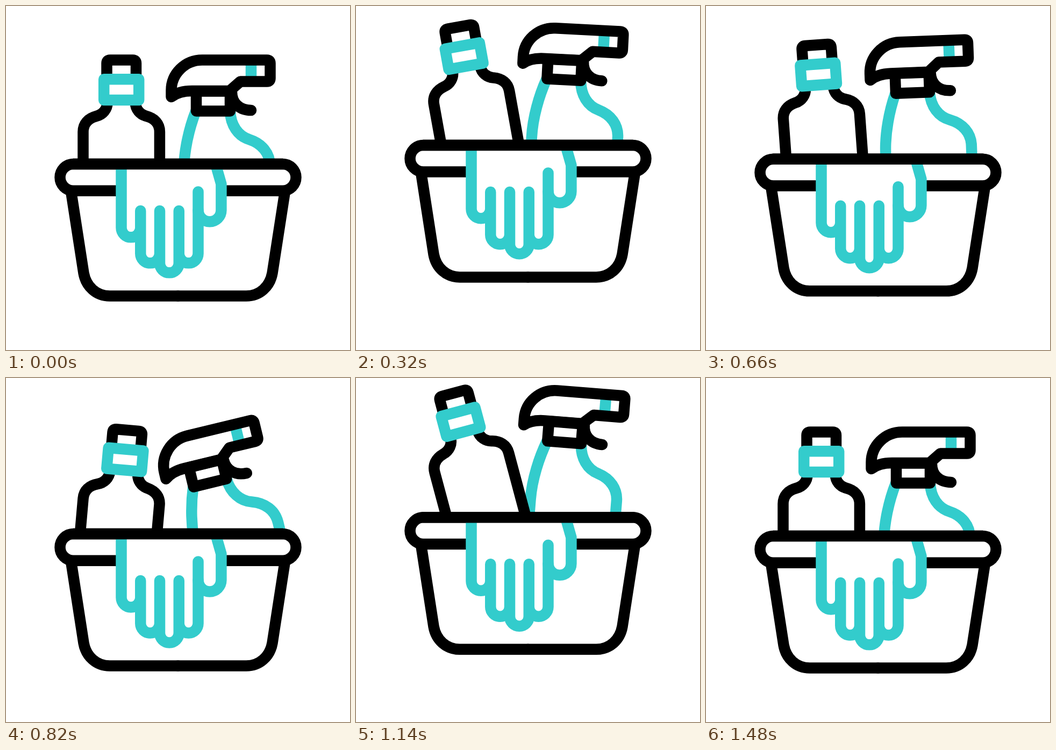
An HTML page for the animation above (2400 ms loop, 640 by 640 pixels).

```html
<!DOCTYPE html>
<html lang="en">
<head>
<meta charset="utf-8">
<title>Cleaning kit</title>
<style>
  html, body { margin: 0; width: 100%; height: 100%; overflow: hidden; background: #fff; }
  svg { display: block; width: 100vw; height: 100vh; }
  g { fill: none; stroke: #000; stroke-width: 20.5; stroke-linecap: round; stroke-linejoin: round; }
  .teal { stroke: #33cccc; }
  .white { fill: #fff; }
  .plain { fill: #fff; stroke: none; }
</style>
</head>
<body>
<svg viewBox="0 0 640 640">
  <defs>
    <clipPath id="above"><rect x="-50" y="-300" width="740" height="600"/></clipPath>
    <clipPath id="wipe"><rect id="window" y="-500" height="2000" transform="rotate(-56.1)"/></clipPath>
  </defs>
  <g id="tub">
    <g clip-path="url(#above)">
      <g id="spray">
        <g class="teal">
          <path d="M353 196C341 227 331 268 331 306V430"/>
          <path d="M417 196C418 222 432 242 453 248.5C476 256 491 274 491 297V430"/>
          <path d="M456 102V139"/>
        </g>
        <path id="trigger" d="M420 160C420 180 434 194 456 194"/>
        <rect x="354" y="158.5" width="63" height="37" class="white"/>
        <path d="M307.5 169V157C307.5 126 333 100.5 365 100.5H485.5q6 0 6 6v28q0 6 -6 6H436L416 158H346C332 158 318 161 307.5 169Z"/>
        <g class="teal" clip-path="url(#wipe)">
          <path d="M528.5 178.3L546.3 196.8M564.2 141.9L593.9 148.1M566.5 101.5L598 94.7"/>
        </g>
      </g>
      <g id="bottle">
        <path id="side" d="M188.5 180C188.5 192 180 202 168 205C153 209 143.5 219 143.5 234V430"/>
        <use href="#side" transform="translate(429.4) scale(-1 1)"/>
        <path d="M187.5 136V106.5q0 -6 6 -6H236q6 0 6 6V136"/>
        <rect x="182.2" y="136.2" width="65" height="38.8" class="teal white"/>
      </g>
    </g>
    <path id="wall" d="M121 345L144.5 497C149 522 168 539.5 193 539.5H320"/>
    <use href="#wall" transform="translate(640) scale(-1 1)"/>
    <rect x="100.5" y="294" width="439" height="49.7" rx="24.85" class="white"/>
    <path d="M214.5 304V370H400.5V331L393 304Z" class="plain"/>
    <g class="teal">
      <path id="fingers"/>
      <path d="M357.6 380a21.4 21.4 0 0 0 42.8 0V331L391 298"/>
    </g>
    <path d="M125 294H515"/>
  </g>
</svg>
<script>
const LOOP = 2400;
const AGAIN = 720; // delay of the second squirt
const el = id => document.getElementById(id);

// progress from 0 to 1 between two times
const linear = (t, a, b) => Math.min(1, Math.max(0, (t - a) / (b - a)));
function ramp(t, a, b) {
  const p = linear(t, a, b);
  return p * p * (3 - 2 * p);
}

// Each part hops twice. times: start, first peak, dip, second peak, landing.
// rise and tilt are the pose at a peak, lean is the tilt in the dip.
const parts = {
  tub: { times: [0, 405, 763, 1060, 1430], hold: 31, rise: -39.5, tilt: 0, lean: 0, pivot: "320 320" },
  bottle: { times: [50, 485, 818, 1135, 1450], hold: 0, rise: -42, tilt: -15, lean: 5, pivot: "214.7 232" },
  spray: { times: [100, 522, 846, 1187, 1485], hold: 0, rise: -42, tilt: 5.5, lean: -14, pivot: "400 222" }
};

function pose(id, t) {
  const { times: [start, peak, dip, peak2, land], hold, rise, tilt, lean, pivot } = parts[id];
  const low = ramp(t, peak + hold, dip) - ramp(t, dip, peak2);
  const high = ramp(t, start, peak) - low - ramp(t, peak2, land);
  const angle = high * tilt + low * lean;
  el(id).setAttribute("transform", `translate(0 ${high * rise}) rotate(${angle} ${pivot})`);
}

function squirt(t) {
  const press = ramp(t, 420, 490) - ramp(t, 520, 600);
  el("trigger").setAttribute("transform", `rotate(${34 * press} 420 160)`);
  const reach = p => 130 + 142 * p;
  const back = reach(linear(t, 510, 575));
  const front = reach(linear(t, 440, 493));
  el("window").setAttribute("x", back);
  el("window").setAttribute("width", front - back);
}

function drawFingers() {
  const gap = 35.75, r = gap / 2;
  const tops = [296, 381, 381, 381, 345.5];
  const tips = [412.5, 460.5, 478.5, 460.5];
  el("fingers").setAttribute("d", tips.map((y, i) =>
    `M${214.5 + i * gap} ${tops[i]}V${y}a${r} ${r} 0 0 0 ${gap} 0V${tops[i + 1]}`).join(""));
}

function draw(t) {
  Object.keys(parts).forEach(id => pose(id, t));
  squirt(t < 1000 ? t : t - AGAIN);
}

const begin = performance.now();
function tick(now) {
  draw(Math.max(0, now - begin) % LOOP);
  requestAnimationFrame(tick);
}
drawFingers();
draw(0);
requestAnimationFrame(tick);
</script>
</body>
</html>
```
